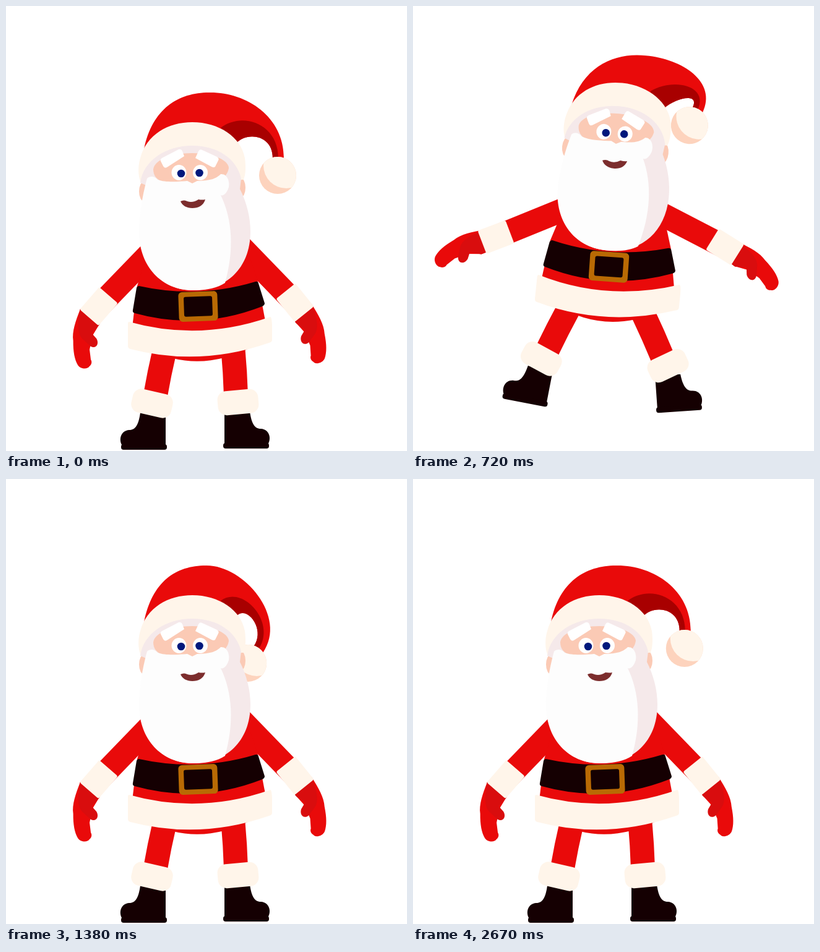
These frames come from a looping animation (648x720 px, 2.7 s). An HTML page with a canvas:

```html
<!DOCTYPE html>
<html lang="en">
<head>
<meta charset="utf-8">
<title>Jumping Santa</title>
<style>
html, body { margin: 0; width: 100%; height: 100%; overflow: hidden; background: #fff; }
canvas { display: block; }
</style>
</head>
<body>
<canvas id="stage" width="648" height="720"></canvas>
<script>
const ctx = document.getElementById('stage').getContext('2d');
const LOOP = 2700;
const RED = '#e90a0a', CREAM = '#fff5ea', BLACK = '#150002', SKIN = '#fbcab5',
      WHITE = '#fdfdfd', LILAC = '#f5e9ea', MAROON = '#a80000';
const rad = deg => deg * Math.PI / 180;

// Poses in order: rest, squat, leap, landing, and rest again unless a fifth is given.
const TIMES = [0, 450, 720, 1050, 1380];
const body = [[311, 486, 0], [305, 519, -5], [317, 422, 6], [321, 494, 8.6]];
// Pom-pom centre and tail direction, in body space; the tail ends curled after the landing.
const hat = [[439, 274, 90], [410, 270, 112], [416, 245, 110], [465, 163, 13], [391, 298, 125]];
// arm: cuff centre, cuff angle, glove angle.
const sides = [
  { side: -1, shoulder: [235, 398], hip: [259, 545], boot: [223, 714],
    arm: [[150, 486, 131, 97], [139, 488, 106, 76], [134, 374, 159, 156], [151, 376, 162, 171]] },
  { side: 1, shoulder: [380, 390], hip: [366, 543], boot: [388, 712],
    arm: [[467, 480, 51, 72], [454, 456, 70, 89], [504, 390, 32, 40], [519, 413, 19, 16]] }
];

// Smooth curve through the poses, at rest at both ends.
function poseAt([...keys], t) {
  keys[4] ??= keys[0];
  const i = Math.max(0, TIMES.findLastIndex(k => k <= t));
  if (i === 4) return keys[4];
  const span = TIMES[i + 1] - TIMES[i], u = (t - TIMES[i]) / span, w = 1 - u;
  const slope = (k, c) => k % 4 ? (keys[k + 1][c] - keys[k - 1][c]) / (TIMES[k + 1] - TIMES[k - 1]) : 0;
  return keys[i].map((from, c) =>
    from * w * w * (1 + 2 * u) + keys[i + 1][c] * u * u * (3 - 2 * u)
    + span * u * w * (slope(i, c) * w - slope(i + 1, c) * u));
}

// Height of the feet, 0 to 1: a quick rise, then a slower fall.
const hopAt = t => Math.max(0, 1 - ((t - 720) / (t < 720 ? 170 : 350)) ** 2);
// Gentle lean to the left while standing.
const swayAt = t => t < 1500 ? 0 : Math.sin(Math.PI * (t - 1500) / 1200) ** 2;

function hatAt(t) {
  if (t < TIMES[4]) return poseAt(hat, t);
  const age = t - TIMES[4];
  const curl = Math.exp(-age / 250) * Math.cos(age / 95) + .25 * swayAt(t);
  return hat[0].map((rest, c) => rest + (hat[4][c] - rest) * curl);
}

function shape(color, d) {
  ctx.fillStyle = color;
  ctx.fill(new Path2D(d));
}
function box(color, x, y, w, h, r) {
  ctx.fillStyle = color;
  ctx.beginPath();
  ctx.roundRect(x, y, w, h, r);
  ctx.fill();
}
function oval(color, x, y, rx, ry = rx) {
  ctx.fillStyle = color;
  ctx.beginPath();
  ctx.ellipse(x, y, rx, ry, 0, 0, 7);
  ctx.fill();
}
function placed(x, y, deg, draw, sx = 1, sy = 1) {
  ctx.save();
  ctx.translate(x, y);
  ctx.rotate(rad(deg));
  ctx.scale(sx, sy);
  draw();
  ctx.restore();
}

// Middle control point of a limb of fixed length, which bows outward when its ends come closer.
function joint([x0, y0], [x1, y1], side, length) {
  const dx = x1 - x0, dy = y1 - y0, d = Math.hypot(dx, dy);
  const bow = side * .7 * Math.sqrt(Math.max(0, length * length - d * d)) / d;
  return [(x0 + x1) / 2 + dy * bow, (y0 + y1) / 2 - dx * bow];
}
function limb(from, bend, to, width) {
  ctx.strokeStyle = RED;
  ctx.lineWidth = width;
  ctx.beginPath();
  ctx.moveTo(...from);
  ctx.quadraticCurveTo(...bend, ...to);
  ctx.stroke();
}

function drawLeg(hip, [footX, footY], side, t) {
  const hop = hopAt(t), spread = hop * hop;
  const x = footX + side * 42 * spread, y = footY - 68 * hop + side * 8 * spread;
  const tilt = (3.5 - 7.5 * side) * spread;
  placed(x, y, tilt, () => {
    shape(BLACK, 'M-35-56H6C9-34 15-28 24-28C37-27 41-14 36-4H-35Z');
    box(BLACK, -37, -5, 74, 9, 4);
  }, side);

  // The cuff sits over the ankle and turns halfway with the bent knee.
  const c = Math.cos(rad(tilt)), s = Math.sin(rad(tilt));
  const ankle = [x - side * 13 * c + 71 * s, y - side * 13 * s - 71 * c];
  const knee = joint(hip, ankle, side, 98);
  const lean = ([px, py]) => Math.atan2(px - ankle[0], ankle[1] - py);
  const turn = (lean(hip) + lean(knee)) * 90 / Math.PI;
  const bend = Math.abs(lean(hip) - lean(knee));
  const cuff = [ankle[0] + side * 9 * bend, ankle[1] + 4 * bend];
  limb(hip, knee, [cuff[0] - side * 3, cuff[1]], 39);
  placed(...cuff, turn, () => box(CREAM, -33, -19.5, 66, 39, 14));
}

function drawGlove() {
  shape(RED, 'M-10 17C10 22 28 26 42 22C60 20 72 16 80 10C87 4 85-7 80-9C76-13 71-12 69-10L53-6L30-8L10-17L-10-18Z');
  shape('#d90d0e', 'M-10 17C8 18 28 18 37 8L47-6C52-16 42-21 34-15L26-6L11-17L-10-18Z');
}
function drawArm(shoulder, [x, y, cuff, glove], side) {
  limb(shoulder, joint(shoulder, [x, y], side, 122), [x, y], 38);
  placed(x + 22 * Math.cos(rad(cuff)), y + 22 * Math.sin(rad(cuff)), glove, drawGlove, 1, -side);
  placed(x, y, cuff, () => box(CREAM, -24, -20, 48, 40, 3));
}

function drawHat([px, py, deg]) {
  const c = Math.cos(rad(deg)), s = Math.sin(rad(deg));
  const ex = px - 28 * c, ey = py - 28 * s;
  // Curve end: offset across the tail, with a handle pointing back along it.
  const tail = (across, x0, y0, pull) => {
    const x = ex + across * s, y = ey - across * c, k = pull * Math.hypot(x - x0, y - y0);
    return [x - k * c, y - k * s, x, y];
  };
  const top = 328 + (274 - py) * .2;
  const outer = tail(10, top, 140, .42), ridge = tail(1, 347, 197, .53);
  const [hx, hy, ix, iy] = tail(-8, 372, 222, .6);
  const inner = `L${ix} ${iy}C${hx} ${hy} 389 203 372 222`;
  shape(RED, `M223 232C236 166 ${top - 49} 140 ${top} 140C${top + 60} 139 ${outer.join(' ')}${inner}L300 250Z`);
  shape(MAROON, `M347 197C382 170 ${ridge.join(' ')}${inner}Z`);
  ctx.save();
  ctx.beginPath();
  ctx.arc(px, py, 30, 0, 7);
  ctx.clip();
  oval('#fdd3bd', px, py, 31);
  oval(CREAM, px + 14, py - 16, 37);
  ctx.restore();
}

function drawTorso() {
  shape(RED, 'M234 380L384 376L407 446L421 520L400 550Q312 597 230 555L204 520L212 453Z');
  shape(CREAM, 'M199 511Q313 543 427 503Q430 503 430 523L430 540Q430 544 425 545Q313 584 201 555Q197 554 197 550L197 514Q197 511 199 511Z');
  shape(BLACK, 'M215 453Q310 474 403 446Q407 445 408 449L418 481Q418 484 414 486Q312 526 208 497Q204 496 205 492L211 456Q212 453 215 453Z');
  placed(310.5, 486, -2, () => {
    box('#b96a04', -31.5, -24, 63, 48, 6);
    box(BLACK, -23, -16, 46, 32, 3);
  });
}

function drawHead() {
  oval(SKIN, 223, 300, 8, 16);
  oval(SKIN, 379, 294, 8, 16);
  shape(CREAM, 'M219 287C212 275 214 255 217 246C227 208 262 188 301 188C344 188 380 212 386 246C388 262 387 273 384 281Z');
  shape(LILAC, 'M226 290L217 286C222 250 258 226 301 226C343 226 373 248 380 279L378 296C389 318 395 342 395 365C395 425 355 460 303 460C250 460 216 420 216 365C216 340 221 310 226 290Z');
  shape(SKIN, 'M238 264C240 249 268 238 301 238C335 238 359 249 360 262C358 276 345 290 301 291C258 291 238 284 238 264Z');
  for (const x of [279.5, 314]) oval('#fff', x, 269.5, 12, 12.5);
  oval('#00187c', 283, 271, 6.3);
  oval('#00187c', 312.5, 270, 6.3);
  shape(WHITE, 'M228 279C234 274 240 276 245 281C258 286 280 284 293 283L301 287L309 283C330 283 340 279 347 272C357 271 362 283 360 293C357 303 351 308 347 306C366 345 369 395 354 448C342 456 325 460 303 460C250 460 216 420 215 368C215 335 222 300 228 279Z');
  shape('#fff', 'M252 246L279 232Q283 231 285 235L288 243L260 261Q256 263 254 259L250 251Q249 248 252 246Z');
  shape('#fff', 'M317 233L341 244Q345 247 343 250L338 260Q336 262 332 260L306 246L311 235Q313 231 317 233Z');
  shape('#7c2d2d', 'M282 316Q288 313 293 316Q302 319 311 313Q317 314 322 313C319 323 311 327 301 327C292 327 285 323 282 316Z');
}

function draw(t) {
  ctx.fillStyle = '#fff';
  ctx.fillRect(0, 0, 648, 720);
  const sway = swayAt(t);
  let [x, y, tilt] = poseAt(body, t);
  x -= sway;
  tilt -= 1.1 * sway;
  const c = Math.cos(rad(tilt)), s = Math.sin(rad(tilt));
  const toStage = ([px, py]) => [x + (px - 311) * c - (py - 486) * s, y + (px - 311) * s + (py - 486) * c];

  for (const { side, shoulder, hip, boot, arm } of sides) {
    drawLeg(toStage(hip), boot, side, t);
    drawArm(toStage(shoulder), poseAt(arm, t), side);
  }
  placed(x, y, tilt, () => {
    ctx.translate(-311, -486);
    drawTorso();
    drawHat(hatAt(t));
    drawHead();
  });
}

function tick() {
  draw(performance.now() % LOOP);
  requestAnimationFrame(tick);
}
tick();
</script>
</body>
</html>
```
